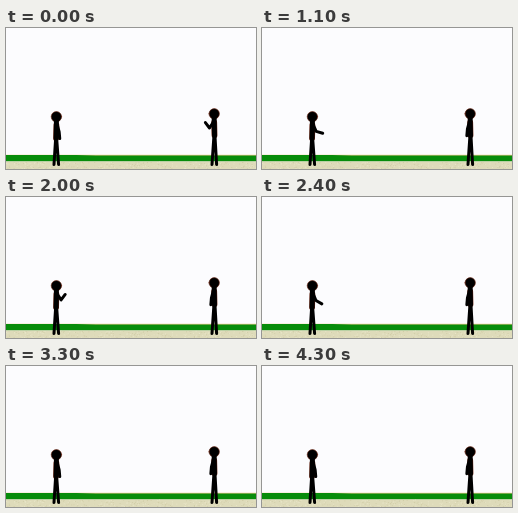
Write an HTML page that moves like this. It is 250 by 141 pixels and loops after 4.4 s.

```html
<!DOCTYPE html>
<html lang="en">
<head>
<meta charset="utf-8">
<style>
html, body { margin: 0; width: 100%; height: 100%; overflow: hidden; background: #fcfcfe; }
svg { display: block; width: 100%; height: 100%; }
.figure { fill: none; stroke: #000; stroke-width: 3; stroke-linecap: round; stroke-linejoin: round; }
.figure circle { fill: #000; stroke: #6e2410; stroke-width: 0.6; }
.figure .torso { stroke-width: 5; }
.figure .rim { stroke: #6e2410; stroke-width: 5.8; }
</style>
</head>
<body>
<svg viewBox="0 0 250 141" preserveAspectRatio="none">
  <rect width="250" height="141" fill="#fcfcfe"/>
  <path d="M0 126.8L80 126.8L250 126.8V129H0Z" fill="#efc98c"/>
  <path d="M0 127L70 127L90 127.6H250V133.4H0Z" fill="#078c0b"/>
  <rect y="133.4" width="250" height="8" fill="#dedbba"/>
  <g id="sand"></g>
  <g id="people" class="figure"></g>
</svg>
<script>
const LOOP = 4400, STEP = 100, FEET = 136.5, LIMB = 6.8;

const ramp = (time, start, end) => Math.min(1, Math.max(0, (time - start) / (end - start)));

// raise: 0 with the arm hanging, 1 with the hand up
const people = [
  { x: 50.4, y: 88.7, facing: 1, raise: t => ramp(t, 700, 1500) - ramp(t, 2100, 2600) },
  { x: 208.2, y: 85.8, facing: -1, raise: t => 1 - ramp(t, 500, 1000) }
];

function armPath(raise) {
  const upper = (15 + 18 * raise) * Math.PI / 180;
  const fore = (5 + 138 * raise) * Math.PI / 180;
  const reach = angle => `l${LIMB * Math.sin(angle)} ${LIMB * Math.cos(angle)}`;
  return `M1 8.5${reach(upper)}${reach(fore)}`;
}

function addPerson(person) {
  const feet = FEET - person.y, hip = 22.5, torso = `M0 8.5L-0.3 ${hip - 1}`;
  const group = document.createElementNS('http://www.w3.org/2000/svg', 'g');
  group.setAttribute('transform', `translate(${person.x} ${person.y}) scale(${person.facing} 1)`);
  group.innerHTML = `
    <path class="rim" d="${torso}"/>
    <circle r="5.2"/>
    <path class="torso" d="M0 5V9${torso}"/>
    <path d="M-0.8 ${hip}L-2.4 ${feet}M0.3 ${hip}L2.2 ${feet}"/>
    <path class="arm"/>`;
  document.getElementById('people').append(group);
  person.arm = group.querySelector('.arm');
}

function scatterSand() {
  let seed = 17;
  const random = () => (seed = seed * 16807 % 2147483647) / 2147483647;
  let specks = '';
  for (let i = 0; i < 300; i++) {
    const x = random() * 250, y = 133.6 + random() * 7;
    const color = i % 2 ? '#cfcba4' : '#ebe8cc';
    specks += `<rect x="${x}" y="${y}" width="1" height="0.7" fill="${color}"/>`;
  }
  document.getElementById('sand').innerHTML = specks;
}

function draw(now) {
  const time = Math.floor(now % LOOP / STEP) * STEP;
  for (const { arm, raise } of people) arm.setAttribute('d', armPath(raise(time)));
}

function tick() {
  draw(performance.now());
  requestAnimationFrame(tick);
}

scatterSand();
people.forEach(addPerson);
tick();
</script>
</body>
</html>
```
